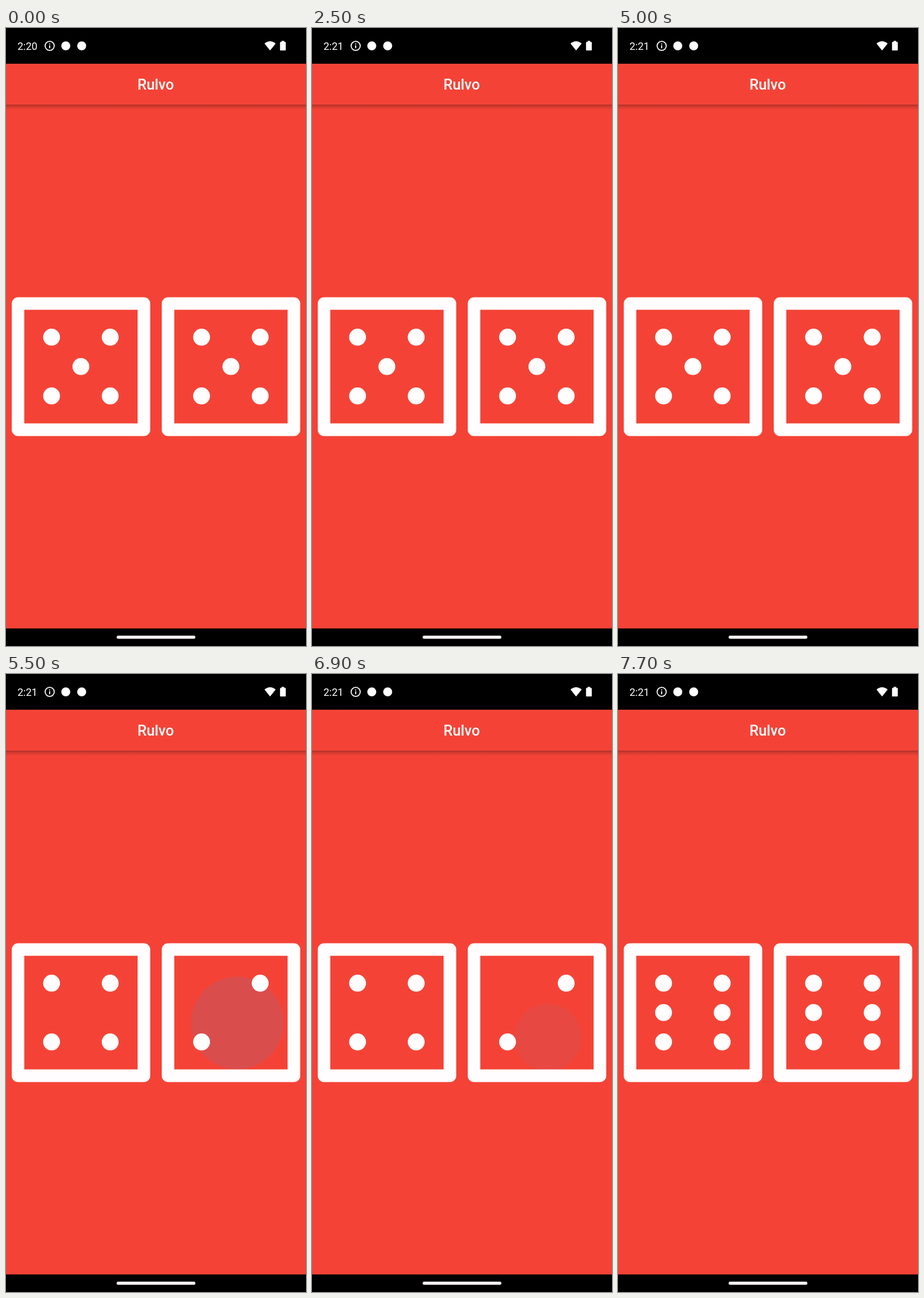
An HTML page with a canvas for the animation above (8000 ms loop, 522 by 1073 pixels).

```html
<!DOCTYPE html>
<html lang="en">
<head>
<meta charset="utf-8">
<title>Rulvo</title>
<style>
  html, body { margin: 0; width: 100%; height: 100%; overflow: hidden; background: #000; }
  canvas { display: block; width: 522px; height: 1073px; }
</style>
</head>
<body>
<canvas id="stage" width="522" height="1073"></canvas>
<script>
const ctx = document.getElementById('stage').getContext('2d');
const LOOP = 8000, STEP = 100;
const RED = '#f44336', WHITE = '#fffdfe';
const FONT = 'Roboto, Arial, sans-serif';

// Ink area of the right button
const INK = { x: 261, y: 457.5, size: 261 };

const TAPS = [
  { down: 5385, up: 5490, x: 405, y: 610 },
  { down: 6863, up: 6970, x: 411, y: 632 }
];

const ROLLS = [
  { at: 0, dice: [5, 5] },
  { at: TAPS[0].up, dice: [4, 2] },
  { at: TAPS[1].up, dice: [6, 6] }
];

// Pip positions as [column, row] steps from the centre
const DIAGONAL = [[1, -1], [-1, 1]];
const CORNERS = [...DIAGONAL, [-1, -1], [1, 1]];
const PIPS = {
  2: DIAGONAL,
  4: CORNERS,
  5: [...CORNERS, [0, 0]],
  6: [...CORNERS, [-1, 0], [1, 0]]
};

const clamp = v => Math.max(0, Math.min(1, v));
const mix = (a, b, p) => a + (b - a) * p;

// cubic-bezier(.25, .1, .25, 1)
function ease(x) {
  let lo = 0, hi = 1;
  const curve = (a, b, u) => 3 * a * u * (1 - u) ** 2 + 3 * b * u * u * (1 - u) + u ** 3;
  for (let i = 0; i < 20; i++) {
    const mid = (lo + hi) / 2;
    if (curve(0.25, 0.25, mid) < x) lo = mid; else hi = mid;
  }
  return curve(0.1, 1, lo);
}

function box(x, y, w, h, color) {
  ctx.fillStyle = color;
  ctx.fillRect(x, y, w, h);
}

function round(x, y, w, h, r, color) {
  ctx.fillStyle = color;
  ctx.beginPath();
  ctx.roundRect(x, y, w, h, r);
  ctx.fill();
}

function disc(x, y, r, color) {
  ctx.fillStyle = color;
  ctx.beginPath();
  ctx.arc(x, y, r, 0, Math.PI * 2);
  ctx.fill();
}

function label(text, x, y, font, align) {
  ctx.font = font;
  ctx.textAlign = align;
  ctx.fillStyle = '#fff';
  ctx.fillText(text, x, y);
}

function drawStatus(time) {
  box(0, 0, 522, 62, '#000');
  label(time, 20, 37.6, `400 18px ${FONT}`, 'left');

  ctx.strokeStyle = '#fff';
  ctx.lineWidth = 1.8;
  ctx.beginPath();
  ctx.arc(76, 31, 7.9, 0, Math.PI * 2);
  ctx.stroke();
  box(75.1, 30, 1.8, 5.2, '#fff');
  box(75.1, 26.8, 1.8, 1.8, '#fff');

  disc(104, 31, 7.8, '#fff');
  disc(131.7, 31, 7.8, '#fff');

  ctx.beginPath();
  ctx.moveTo(459.5, 39);
  ctx.lineTo(449.8, 27);
  ctx.quadraticCurveTo(459.5, 19.2, 469.2, 27);
  ctx.closePath();
  ctx.fill();

  round(476.8, 24.2, 10, 14.8, 1, '#fff');
  box(479.4, 22.4, 4.8, 2.4, '#fff');
}

function drawBar() {
  const shade = ctx.createLinearGradient(0, 133, 0, 142);
  shade.addColorStop(0, 'rgba(0,0,0,.28)');
  shade.addColorStop(0.4, 'rgba(0,0,0,.13)');
  shade.addColorStop(1, 'rgba(0,0,0,0)');
  box(0, 133, 522, 9, shade);
  label('Rulvo', 260.5, 107, `500 25.4px ${FONT}`, 'center');
}

function drawRipple(tap, t) {
  const held = t - tap.down, freed = t - tap.up;
  if (held < 0 || freed > 375) return;
  const grow = Math.min(held, tap.up - tap.down) / 1000 + Math.max(0, freed) / 225;
  const p = ease(clamp(grow));
  const fade = clamp(held / 75) * (1 - clamp((freed - 225) / 150));
  const half = INK.size / 2;
  const reach = half * Math.SQRT2;

  ctx.save();
  ctx.beginPath();
  ctx.roundRect(INK.x, INK.y, INK.size, INK.size, 5);
  ctx.clip();
  disc(mix(tap.x, INK.x + half, p), mix(tap.y, INK.y + half, p),
    mix(reach * 0.3, reach + 6.4, p), `rgba(33,150,243,${0.12 * fade})`);
  ctx.restore();
}

function drawDie(x, value) {
  ctx.fillStyle = WHITE;
  ctx.beginPath();
  ctx.roundRect(x, 467.5, 241, 241, 11);
  ctx.rect(x + 21.8, 489.2, 197.2, 197.2);
  ctx.fill('evenodd');
  for (const [col, row] of PIPS[value]) {
    disc(x + 120.3 + col * 51, 587.8 + row * 51, 14.7, WHITE);
  }
}

function draw(t) {
  box(0, 0, 522, 1073, RED);
  drawBar();
  TAPS.forEach(tap => drawRipple(tap, t));
  const { dice } = ROLLS.filter(roll => roll.at <= t).pop();
  drawDie(10, dice[0]);
  drawDie(271, dice[1]);
  drawStatus(t < 900 ? '2:20' : '2:21');
  box(0, 1042.5, 522, 30.5, '#000');
  round(192.5, 1055, 137, 5.4, 2.7, '#f6f0f0');
}

const start = performance.now();
function tick() {
  const t = (performance.now() - start) % LOOP;
  draw(Math.floor(t / STEP) * STEP);
  requestAnimationFrame(tick);
}
tick();
</script>
</body>
</html>
```
